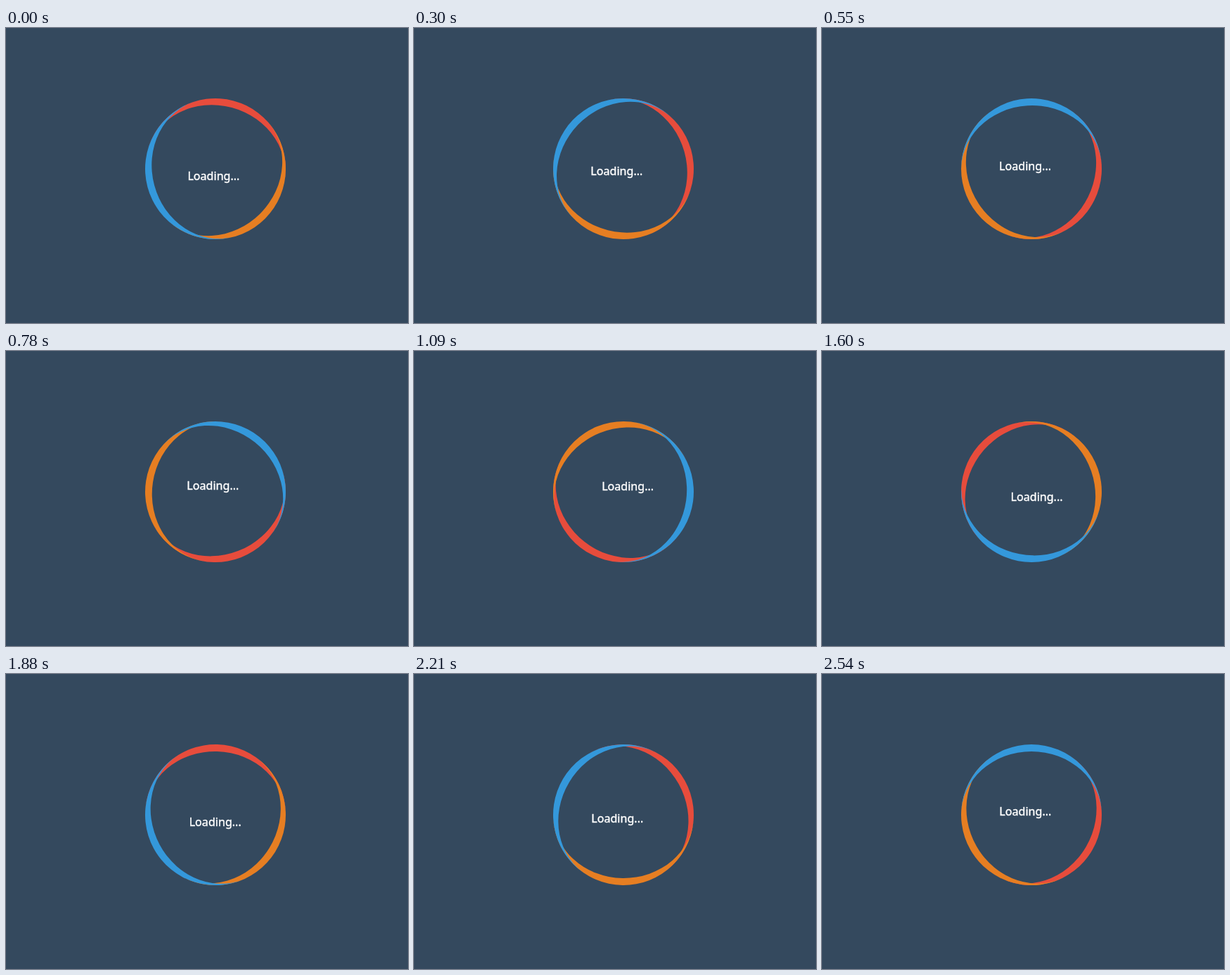
An HTML page for the animation above (2570 ms loop, 572x419 px).

```html
<!DOCTYPE html>
<html lang="en">
<head>
<meta charset="utf-8">
<title>Loading</title>
<style>
  html, body { margin: 0; width: 100%; height: 100%; overflow: hidden; background: #34495e; }
  svg { display: block; width: 572px; height: 419px; }
  text {
    font: 16.1px "Noto Sans", "Open Sans", sans-serif;
    fill: #fff; stroke: #fff; stroke-width: 0.4px; text-anchor: middle;
  }
</style>
</head>
<body>
<svg viewBox="0 0 572 419">
  <defs>
    <path id="crescent" d="M-100 0A100 100 0 0 1 100 0A100 90 0 0 0 -100 0Z"/>
  </defs>
  <g id="ring">
    <use href="#crescent" fill="#e74c3c"/>
    <use href="#crescent" fill="#e67e22" transform="rotate(120)"/>
    <use href="#crescent" fill="#3498db" transform="rotate(240)"/>
  </g>
  <text id="label">Loading...</text>
</svg>
<script>
  const LOOP = 2570, CX = 298, CY = 200, ORBIT = 10, BASELINE = 6;
  // The ring turns evenly in small ticks, then jumps back at the loop end.
  const TICK_MS = 46.3, PHASE = 0.53, TICKS = 55;
  const FROM = 15, TO = 480;

  const ring = document.getElementById('ring');
  const label = document.getElementById('label');

  function draw(ms) {
    const tick = Math.min(TICKS, Math.floor((ms % LOOP) / TICK_MS + PHASE));
    const deg = FROM + (TO - FROM) * tick / TICKS;
    const rad = deg * Math.PI / 180;
    ring.setAttribute('transform', `translate(${CX} ${CY}) rotate(${deg})`);
    // The label rides the same turn on a small orbit but stays upright.
    label.setAttribute('x', CX - ORBIT * Math.sin(rad));
    label.setAttribute('y', CY + BASELINE + ORBIT * Math.cos(rad));
  }

  const start = performance.now();
  function animate() {
    draw(performance.now() - start);
    requestAnimationFrame(animate);
  }
  animate();
</script>
</body>
</html>
```
